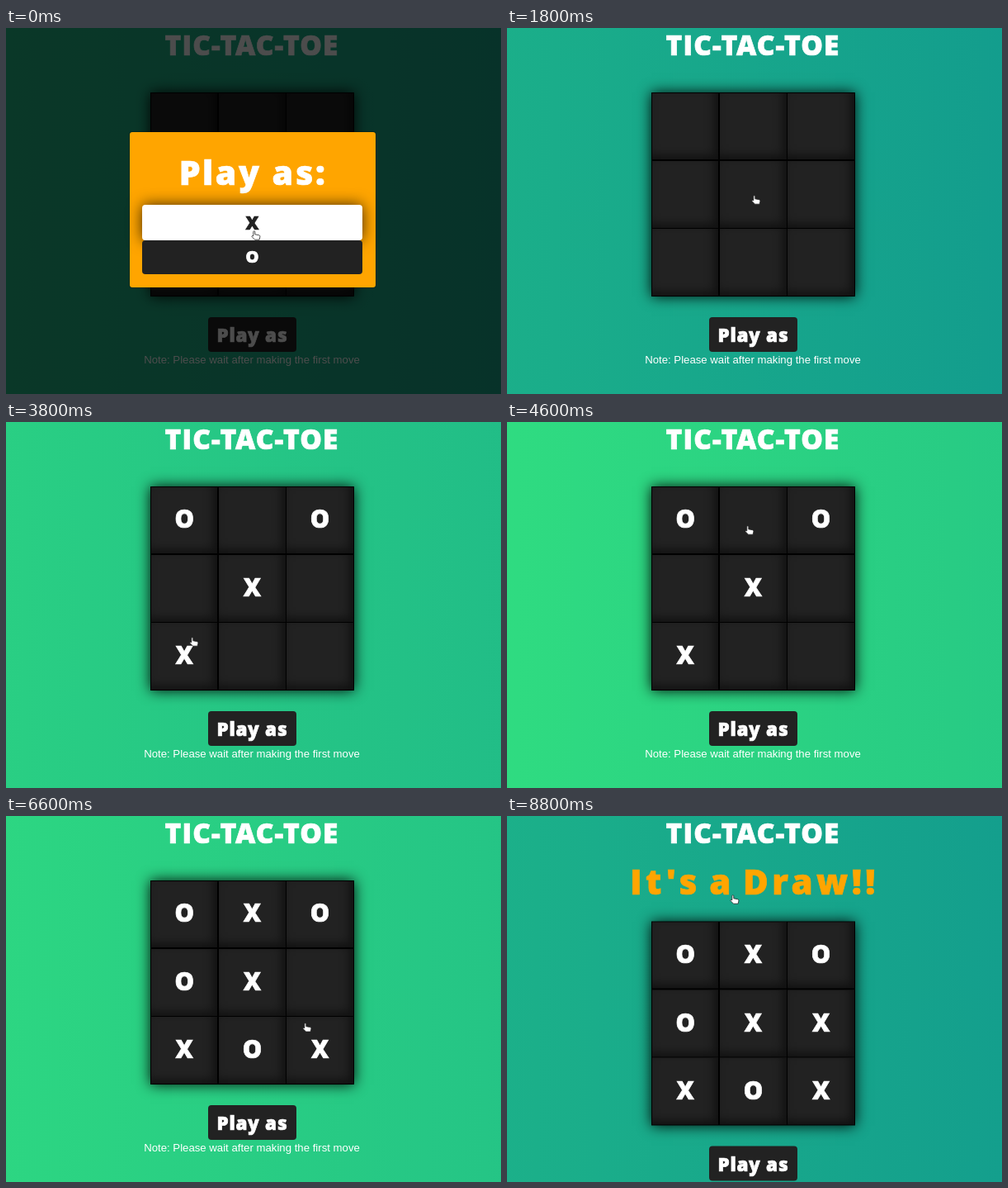
Recreate the animation shown at these times as an HTML page. Size 600x443 px, loop 9000 ms.

```html
<!DOCTYPE html>
<html lang="en">
<head>
<meta charset="utf-8">
<title>Tic-Tac-Toe</title>
<style>
html, body { margin: 0; width: 100%; height: 100%; overflow: hidden; }
#stage {
  position: relative; width: 600px; height: 443px; overflow: hidden;
  background: linear-gradient(to right, #38ef7d, #11998e) 0 0 / 500% 100%;
  font: 800 22px "Open Sans", "Noto Sans", sans-serif; color: #fff;
  -webkit-text-stroke: .7px currentColor;
}
#stage div, #hand { position: absolute; box-sizing: border-box; }
.label { display: flex; align-items: center; justify-content: center; white-space: pre; line-height: 1; }
#title { left: 0; top: 0; width: 596px; height: 41px; font-size: 33.5px; letter-spacing: 1.1px; }
#msg { left: 0; top: 59px; width: 600px; height: 40px; font-size: 42px; letter-spacing: 4.4px; word-spacing: -5px; color: orange; }
#game { left: 0; top: 0; width: 600px; height: 443px; }
#board {
  left: 174.5px; top: 77.5px; width: 247.5px; height: 247.5px; background: #000;
  box-shadow: 0 0 16px rgba(0, 0, 0, .95);
}
.cell {
  width: 80.4px; height: 80.4px; padding-bottom: 4px; font-size: 29.5px; background: #222;
  box-shadow: inset -5px -5px 11px rgba(0, 0, 0, .5);
}
#again { left: 245px; top: 349.5px; width: 107px; height: 42.5px; padding-top: 2px; border-radius: 4px; background: #222; font-size: 22.5px; letter-spacing: .7px; }
#note { left: 0; top: 394px; width: 596px; height: 15px; font: 13.2px "Liberation Sans", Arial, sans-serif; -webkit-text-stroke: 0; }
#modal { left: 0; top: 0; width: 600px; height: 443px; background: rgba(0, 0, 0, .7); }
#card { left: 148.5px; top: 124.5px; width: 300px; height: 190.5px; border-radius: 4px; background: orange; border: 1px solid rgba(0, 0, 0, .2); background-clip: padding-box; }
#ask { left: 0; top: 28px; width: 300px; height: 42px; font-size: 41px; letter-spacing: 2.5px; }
.pick { left: 15.5px; width: 267px; height: 42.5px; border-radius: 4px; }
#pickX { top: 88.5px; background: #fff; color: #222; box-shadow: 0 0 18px rgba(0, 0, 0, .75); }
#pickO { top: 131px; height: 41.5px; background: #222; font-size: 20px; }
#hand { left: -8px; top: -8px; width: 16px; height: 16px; }
</style>
</head>
<body>
<div id="stage">
  <div id="title" class="label">TIC-TAC-TOE</div>
  <div id="msg" class="label">It's a Draw!!</div>
  <div id="game">
    <div id="board"></div>
    <div id="again" class="label">Play as</div>
    <div id="note" class="label">Note: Please wait after making the first move</div>
  </div>
  <div id="modal">
    <div id="card">
      <div id="ask" class="label">Play as:</div>
      <div id="pickX" class="pick label">X</div>
      <div id="pickO" class="pick label">O</div>
    </div>
  </div>
  <svg id="hand" viewBox="-8 -8 16 16">
    <path d="M-3.2-4.6q1-1.2 2 0v3.4l4.8.9q1.6.4 1.3 2l-.8 3.5h-5.6l-3.6-3.8q.2-1.6 1.9-.6z" fill="#fff" stroke="#222" stroke-width=".8"/>
  </svg>
</div>
<script>
const LOOP = 9000, STEP = 200;
const FIRST = 650, TURN = 1350, REPLY = 400;
const order = [4, 0, 6, 2, 1, 7, 8, 3, 5]; // cells in playing order, X first
const stops = [[303, 251], [302, 208], [228, 266], [294, 131], [365, 256], [386, 195], [276, 101]];

const $ = id => document.getElementById(id);
const clamp = v => Math.min(1, Math.max(0, v));
const smooth = v => v * v * (3 - 2 * v);

// X plays once per turn, O answers shortly after
const moveTime = n => FIRST + TURN * (1 + Math.floor(n / 2)) + n % 2 * REPLY;
const drawTime = moveTime(order.length - 1);

const cells = Array.from({ length: 9 }, (_, i) => {
  const cell = document.createElement('div');
  cell.className = 'cell label';
  cell.style.left = 1.5 + i % 3 * 82.2 + 'px';
  cell.style.top = 1.5 + Math.floor(i / 3) * 82.2 + 'px';
  cell.textContent = order.indexOf(i) % 2 ? 'O' : 'X';
  $('board').append(cell);
  return cell;
});

// The hand rests at each stop, then glides to the next within the turn
function handAt(t) {
  const turn = clamp((t - FIRST) / TURN / (stops.length - 1)) * (stops.length - 1);
  const i = Math.min(Math.floor(turn), stops.length - 2);
  const f = smooth(clamp((turn - i - 0.4) / 0.35));
  return stops[i].map((v, n) => v + (stops[i + 1][n] - v) * f);
}

function render(t) {
  const [x, y] = handAt(t), drawn = t >= drawTime;
  const drift = 58.5 + 37 * Math.cos((t - 1400) / 8000 * 2 * Math.PI);
  $('stage').style.backgroundPosition = drift + '% 0';
  $('hand').style.transform = `translate(${x}px, ${y}px)`;
  order.forEach((cell, n) => cells[cell].style.color = t >= moveTime(n) ? '#fff' : 'transparent');
  $('game').style.transform = `translateY(${drawn ? 49.5 : 0}px)`;
  $('msg').style.visibility = drawn ? 'visible' : 'hidden';
  $('modal').style.opacity = clamp((400 - t) / 300);
}

const start = performance.now();
function tick() {
  const t = (performance.now() - start) % LOOP;
  render(Math.floor(t / STEP) * STEP);
  requestAnimationFrame(tick);
}
tick();
</script>
</body>
</html>
```
